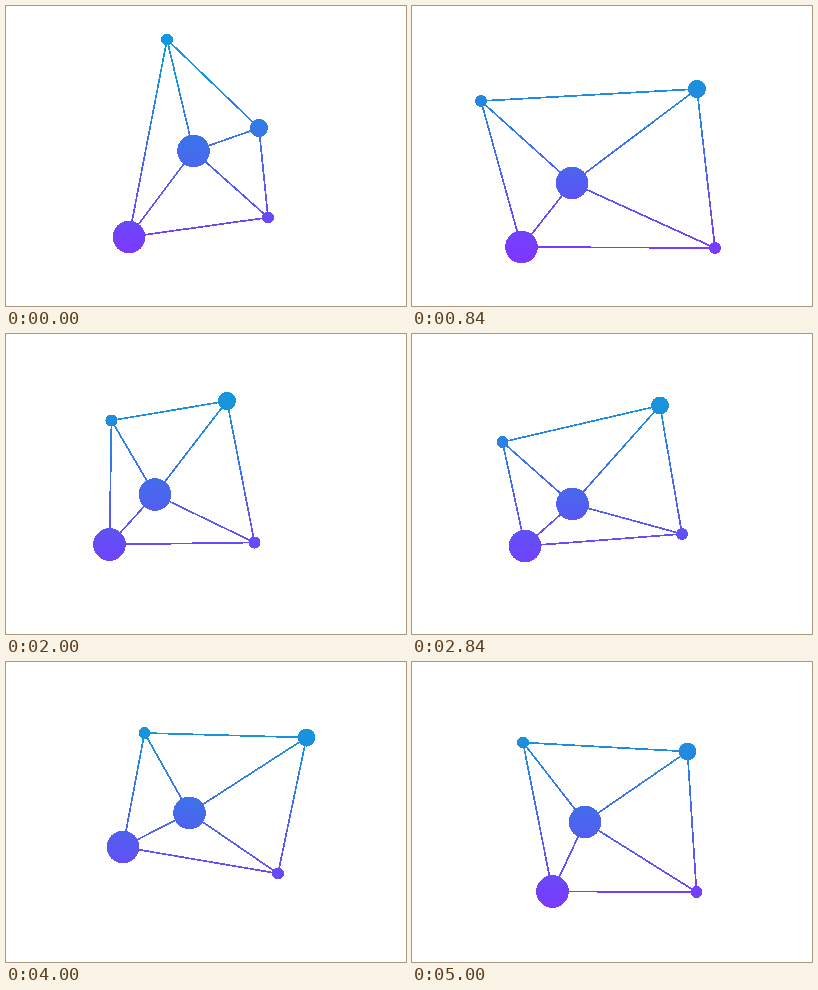
Recreate the animation shown at these times as an HTML page. Size 400x300 px, loop 5.04 s.

```html
<!DOCTYPE html>
<html lang="en">
<head>
<meta charset="utf-8">
<title>Drifting network</title>
<style>
  html, body { margin: 0; width: 100%; height: 100%; overflow: hidden; background: #fff; }
  svg { display: block; }
</style>
</head>
<body>
<svg width="400" height="300" shape-rendering="crispEdges" fill="url(#tint)">
  <linearGradient id="tint" gradientUnits="userSpaceOnUse" x1="0" y1="65" x2="0" y2="245">
    <stop stop-color="#1497db"/>
    <stop offset="1" stop-color="#7b39ff"/>
  </linearGradient>
  <path id="edges" fill="none" stroke="url(#tint)" stroke-width="1.7"/>
  <circle r="16.3"/>
  <circle r="6"/>
  <circle r="9"/>
  <circle r="6"/>
  <circle r="16.3"/>
</svg>
<script>
const LOOP = 5040, STEP = 40;

// Key poses: time in ms, then x, y of hub, top, right, low, left
const poses = [
  [0, 187.5, 145, 161, 33.5, 253, 122, 262, 211.5, 123, 231],
  [840, 160, 177, 69, 95, 285, 83, 303, 242, 109.5, 241],
  [1320, 148, 160, 124.5, 102, 240.5, 89, 297, 231, 117, 222],
  [2000, 149, 160.5, 105.5, 86.5, 221, 67, 248.5, 208.5, 103.5, 210.5],
  [2840, 160.5, 170, 90.5, 108, 248, 71.5, 270, 200, 113, 212],
  [4000, 183.5, 151, 138.5, 71, 300.5, 75.5, 272, 211.5, 117, 185],
  [5000, 173, 160, 111, 80.5, 275.5, 89.5, 284.5, 230, 140.5, 229.5]
];

const circles = document.querySelectorAll('circle');
const edges = document.getElementById('edges');

function slope(i, k) {
  const a = poses[Math.max(i - 1, 0)], b = poses[Math.min(i + 1, poses.length - 1)];
  return (b[k] - a[k]) / (b[0] - a[0]);
}

function nodesAt(t) {
  let i = 0;
  while (i < poses.length - 2 && t >= poses[i + 1][0]) i++;
  const p = poses[i], q = poses[i + 1], span = q[0] - p[0];
  const u = (t - p[0]) / span, v = 1 - u;

  // Cubic Hermite curve through the poses
  const coord = k => v * v * (1 + 2 * u) * p[k] + u * u * (3 - 2 * u) * q[k]
    + span * u * v * (v * slope(i, k) - u * slope(i + 1, k));

  // Between poses the net widens or narrows sideways around its hub
  const breath = 0.12 + 0.22 * Math.cos(2 * Math.PI * t / LOOP + 0.36);
  const stretch = 1 + breath * Math.sin(Math.PI * u) ** 2;
  const hubX = coord(1);
  return Array.from(circles, (_, n) =>
    [hubX + (coord(2 * n + 1) - hubX) * stretch, coord(2 * n + 2)]);
}

function draw(t) {
  const nodes = nodesAt(t), [hub, ...rim] = nodes;
  nodes.forEach(([x, y], n) => {
    circles[n].setAttribute('cx', x);
    circles[n].setAttribute('cy', y);
  });
  const spokes = rim.map(node => `M${hub}L${node}`).join('');
  edges.setAttribute('d', `M${rim.join('L')}Z${spokes}`);
}

function tick() {
  const t = performance.now() % LOOP;
  draw(Math.floor(t / STEP) * STEP);
  requestAnimationFrame(tick);
}
tick();
</script>
</body>
</html>
```
